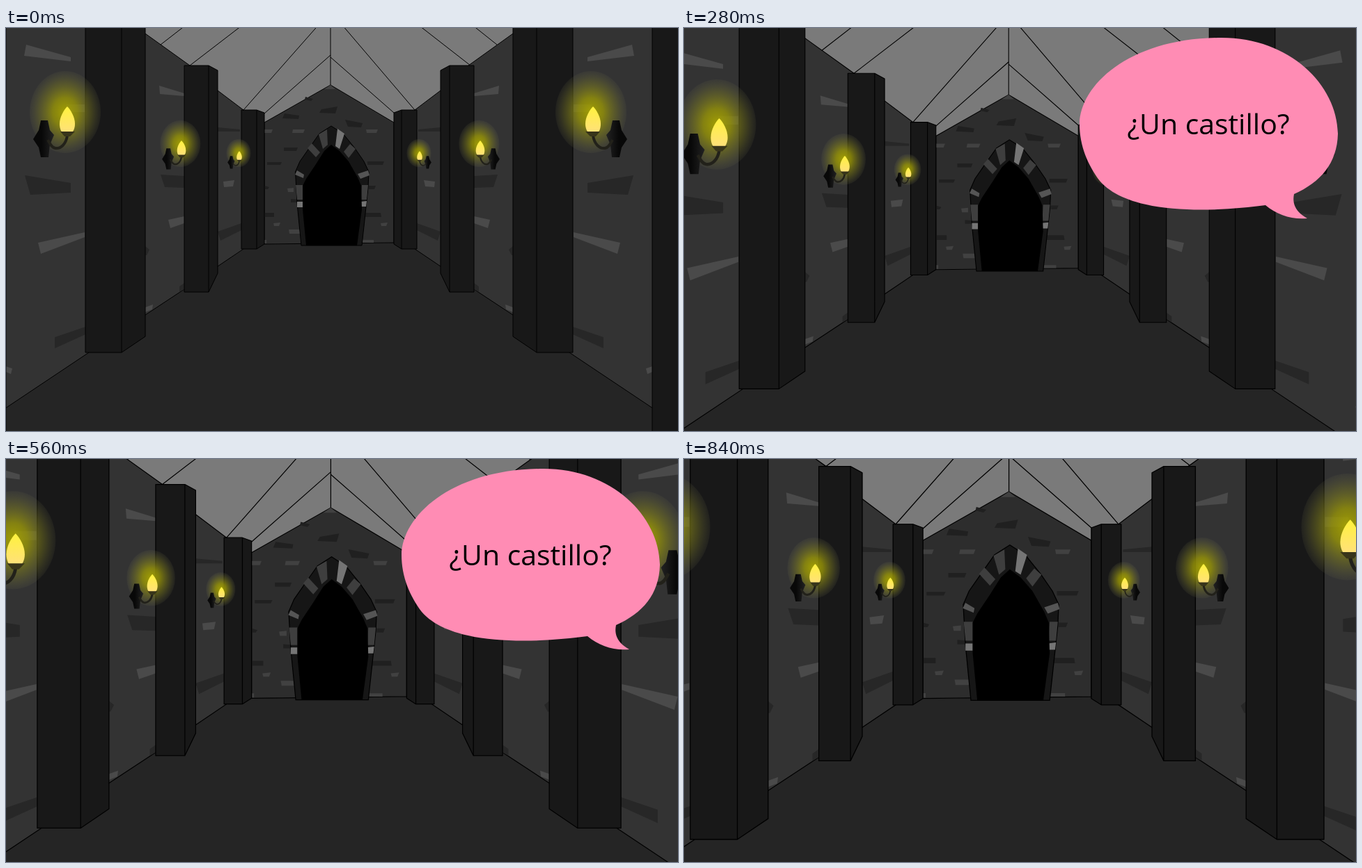
Animation of 965 by 580 pixels, one loop 880 ms. Source, as an HTML page:

```html
<!DOCTYPE html>
<html lang="es">
<head>
<meta charset="utf-8">
<style>
  html, body { margin: 0; width: 100%; height: 100%; overflow: hidden; background: #252525; }
  svg { display: block; }
  .line { fill: none; stroke: #000; }
  .wall { fill: #333; stroke: #000; }
  .pillar { fill: #181818; stroke: #000; stroke-linejoin: round; }
  .light { fill: #4a4a4a; }
  .dark { fill: #272727; }
  .back .light { fill: #414141; }
  .back .dark { fill: #202020; }
  .stone { fill: #3e3e3e; }
  .bright { fill: #757575; }
  text { font: 41px "Open Sans", "Noto Sans", sans-serif; text-anchor: middle; }
</style>
</head>
<body>
<svg width="965" height="580" viewBox="0 0 965 580">
  <defs>
    <radialGradient id="glowFill">
      <stop offset="0" stop-color="#a8a400" stop-opacity=".95"/>
      <stop offset=".35" stop-color="#989508" stop-opacity=".8"/>
      <stop offset=".75" stop-color="#7c7b28" stop-opacity=".4"/>
      <stop offset="1" stop-color="#6b6b48" stop-opacity=".12"/>
    </radialGradient>
    <linearGradient id="flameFill" x2="0" y2="1">
      <stop offset="0" stop-color="#fff23c"/>
      <stop offset="1" stop-color="#ffe07c"/>
    </linearGradient>
    <linearGradient id="ironFill">
      <stop offset=".4" stop-color="#080808"/>
      <stop offset="1" stop-color="#222"/>
    </linearGradient>
    <ellipse id="glow" cx="-3" cy="-29" rx="51" ry="59" fill="url(#glowFill)"/>
    <g id="torch">
      <path d="M-38-17H-28L-25-3L-19 4L-25 18L-27 36H-38L-41 22L-49 10L-41-3Z" fill="url(#ironFill)"/>
      <path d="M0 5C-2 17-9 24-17 23C-23 22-25 16-28 11" fill="none" stroke="#22211a" stroke-width="4"/>
      <path d="M0-37C5-32 11-22 11-12C11-5 8 0 6 1H-6C-9 0-11-6-11-12C-11-22-5-32 0-37Z" fill="url(#flameFill)"/>
      <path d="M-10-1H11L4 6H-4Z" fill="#38351a"/>
    </g>
    <g id="side">
      <path class="wall" d="M-2-142L200 8L264 54L304 90L341 118V318L304 343L256 376L200 413L119 467L-2 548Z"/>
      <path class="light" d="M29 24L93 42V48L26 40ZM46 309L113 294V301L50 325ZM0 487L9 490L7 498L0 495ZM87 110H113V121H84Z
        M220 83L256 94V98L221 95ZM233 276L256 271V281L236 288ZM200 402L211 398L210 405L200 409ZM312 221L328 219L326 228L313 229Z"/>
      <path class="dark" d="M27 212L93 223V237L35 240ZM70 445L114 430V441L70 461ZM222 211L256 213V230L228 229Z
        M200 314L206 319L202 327H200ZM249 372L256 367V376L249 380ZM304 143L336 146V149H304ZM304 293L338 281V291L308 306Z"/>
      <path class="pillar" d="M338 118H360L371 122V311L360 318H338ZM360 118V318"/>
      <path class="pillar" d="M256 54H291L304 61V353L291 380H256ZM291 54V380"/>
      <path class="pillar" d="M114-60H200V444L166 467H114ZM166-60V467"/>
      <path class="pillar" d="M0-60V640H-60V-60Z"/>
    </g>
  </defs>

  <g id="hall">
    <path d="M0-60H965V330H0Z" fill="#7a7a7a"/>
    <path d="M0 547L341 318L371 311L557 309L590 318L928 549V700H0Z" fill="#252525"/>
    <path class="line" d="M466-60V82M466-24L341 118M466-24L587 118M371 123L466 39M466 42L557 122
      M412-60L264 54M330-60L222 24M521-60L667 54M600-60L705 24"/>
    <g class="back">
      <path d="M371 136L466 82L557 136V309L371 311Z" fill="#2d2d2d" stroke="#000"/>
      <path class="dark" d="M400 123L421 126L420 131L397 130ZM453 117L476 113L473 123L450 122ZM487 132L512 137L510 143L491 142ZM430 99L441 102L438 105L429 103Z
        M399 172H419L417 177H399ZM375 193H396L394 197H375ZM519 192H543L541 197H519ZM371 227L378 229L376 232H371ZM521 227H531L529 232H521Z
        M409 246L422 247V251H409ZM371 266H385V272H371ZM515 266H538L539 272H515Z"/>
      <path class="light" d="M371 146H383L381 151H371ZM412 146H429L427 151H411ZM517 146H534L532 151H518ZM466 82L473 88H457Z
        M404 231L413 230V236H405ZM384 281L394 280L392 285H385ZM406 290H422V296H407ZM538 281L548 280L546 285H539ZM511 305H528V309H511ZM371 305H374V310H371Z"/>
    </g>
    <path d="M424 313L418 252L415.500 207L422 192L438 169L450 152L467 141L484 152L501 173L514 192L521 207L520 230L511 313Z" fill="#161616" stroke="#000"/>
    <path class="stone" d="M449 153L461 146L462 168L455 174ZM433 173L439 166L451 179L445 186ZM494 167L502 174L492 187L485 178Z
      M416 226H426V247H418ZM511 226H520L518 247H510Z"/>
    <path d="M418 205L428 211L427 216L415 211ZM505 210L520 205L522 212L509 217Z" fill="#555"/>
    <path class="bright" d="M476 145L486 152L479 174L473 170ZM418 250H426V258H418ZM509 250L518 249L517 257H509Z"/>
    <path d="M431 313L426 261V227L431 217L445 196L457 177L467 168L479 177L492 192L505 215L510 227L511 261L504 313Z"/>
    <use href="#side"/>
    <use href="#side" transform="translate(928) scale(-1 1)"/>
    <g id="torches"></g>
  </g>

  <g id="bubble">
    <path d="M568 138C569 82 640 14 772 14C870 14 938 82 939 152C938 195 914 222 876 239C873 254 879 265 895 274C872 276 852 269 835 255C760 265 640 270 597 220C580 197 568 170 568 138Z" fill="#ff8cb4"/>
    <text x="753" y="153">¿Un castillo?</text>
  </g>
</svg>
<script>
  const LOOP = 880, STEP = 40;
  const hall = document.getElementById('hall');
  const bubble = document.getElementById('bubble');

  // x, y of the flame base, size, direction
  const torches = [
    [335, 190, .345, 1], [594, 190, .345, -1],
    [252, 183, .57, 1], [681, 183, .57, -1],
    [88, 150, 1, 1], [843, 150, 1, -1]
  ];
  document.getElementById('torches').innerHTML = torches.map(([x, y, size, dir]) => `
    <use href="#glow" transform="translate(${x} ${y}) scale(${size})"/>
    <use href="#torch" transform="translate(${x} ${y}) scale(${size * dir} ${size})"/>`).join('');

  // Walking: steady zoom with a bob at each step, as [time, value] keys
  const zoom = [[0, 1], [80, 1.0305], [200, 1.0725], [360, 1.1265], [560, 1.1975], [680, 1.2465], [840, 1.3]];
  const bob = [[0, 0], [80, 2.5], [200, 13.3], [240, 14], [360, -10.4], [480, -35], [560, -28.1], [640, -21], [680, -28.4], [840, -59.6]];

  function valueAt(keys, t) {
    const i = Math.max(1, keys.findIndex(key => key[0] >= t));
    const [t0, v0] = keys[i - 1], [t1, v1] = keys[i];
    return v0 + (v1 - v0) * (t - t0) / (t1 - t0);
  }

  function draw() {
    const t = Math.floor(performance.now() % LOOP / STEP) * STEP;
    const s = valueAt(zoom, t);
    hall.setAttribute('transform', `translate(${464 * (1 - s)} ${valueAt(bob, t)}) scale(${s})`);
    bubble.style.display = t >= 40 && t < 600 ? '' : 'none';
    requestAnimationFrame(draw);
  }
  draw();
</script>
</body>
</html>
```
